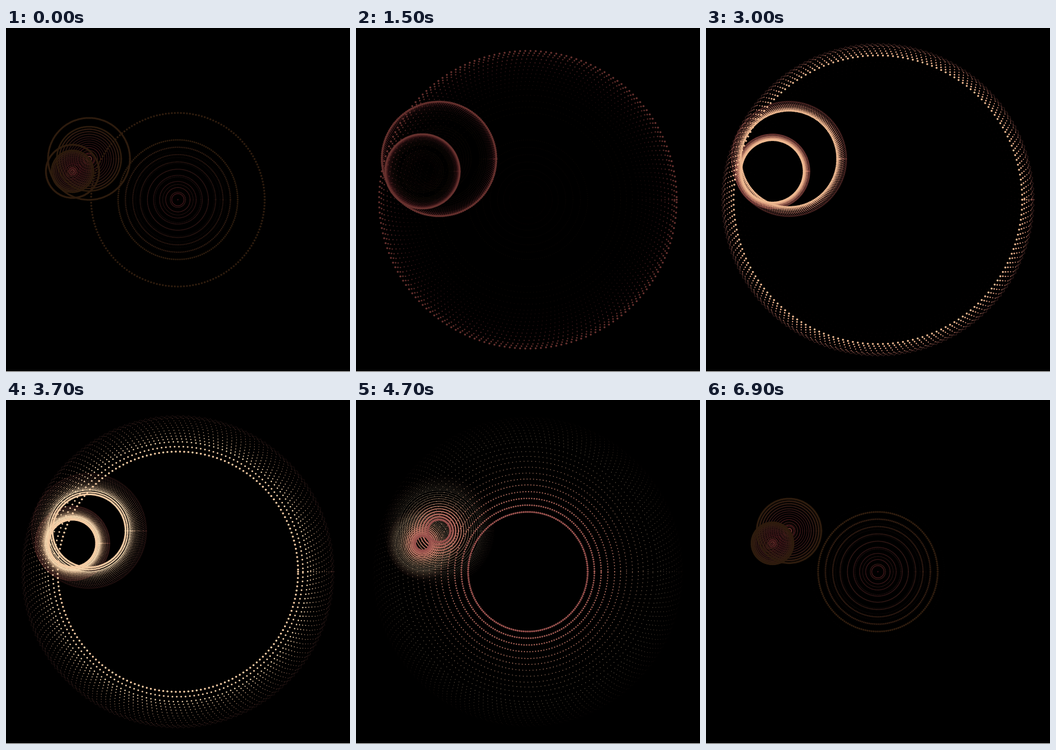
Write an HTML page with a canvas that moves like this. It is 600 px wide and 600 px high and loops after 7 s.

```html
<!DOCTYPE html>
<html>
<head>
<meta charset="utf-8">
<title>Breathing rings</title>
<style>
  html, body { margin: 0; height: 100%; background: #000; overflow: hidden; }
  canvas { display: block; width: 600px; height: 600px; }
</style>
</head>
<body>
<canvas id="stage" width="600" height="600"></canvas>
<script>
const ctx = document.getElementById('stage').getContext('2d');
const FRAMES = 70, STEP = 100, STATES = 16, DOTS = 180, WAKE = 24;

const rings = [
  { x: 299.8, y: 299.5, size: 272.5, phase: 0 },
  { x: 144.8, y: 228.3, size: 101, phase: 1 },
  { x: 116, y: 250, size: 65.5, phase: 1 },
];

// From the brightest state outwards to the darkest one.
const palette = [
  [250, 220, 180], [238, 185, 145], [205, 130, 110],
  [150, 80, 76], [115, 58, 54], [88, 40, 38],
  [74, 28, 32], [56, 27, 24], [46, 28, 14],
];

const mix = (a, b, t) => a + (b - a) * t;
const stateFrame = i => Math.round(i * (FRAMES - 1) / STATES);
const stateColor = i => palette[Math.abs(i - STATES / 2)];

function stateRadius(ring, i) {
  const k = i < 14 ? i + 3 : i - 14;
  return ring.size * Math.sin((k + ring.phase) * Math.PI / 16);
}

// Linear tween between the two states around a frame.
function tween(frame) {
  let i = 0;
  while (i < STATES - 1 && frame >= stateFrame(i + 1)) i++;
  const start = stateFrame(i);
  const t = (frame - start) / (stateFrame(i + 1) - start);
  const next = stateColor(i + 1);
  return {
    turn: t,
    color: stateColor(i).map((c, n) => Math.round(mix(c, next[n], t))),
    radii: rings.map(r => mix(stateRadius(r, i), stateRadius(r, i + 1), t)),
  };
}

const poses = Array.from({ length: FRAMES }, (_, f) => tween(f));

function drawPose(pose, age) {
  const life = 1 - age / WAKE;
  const size = mix(0.6, 1.75, life ** 6);
  ctx.fillStyle = `rgb(${pose.color})`;
  ctx.globalAlpha = life;
  rings.forEach((ring, n) => {
    const dot = place => {
      const a = place / DOTS * 2 * Math.PI;
      ctx.beginPath();
      ctx.arc(ring.x + pose.radii[n] * Math.cos(a),
              ring.y - pose.radii[n] * Math.sin(a), size, 0, 2 * Math.PI);
      ctx.fill();
    };
    // Each state moves the dots one place clockwise; one dot rests on the axis.
    for (let j = 1; j <= DOTS; j++) dot(j - pose.turn);
    dot(0);
  });
}

let shown = -1;
function render(now) {
  const frame = Math.floor(now / STEP) % FRAMES;
  if (frame !== shown) {
    shown = frame;
    ctx.globalAlpha = 1;
    ctx.fillStyle = '#000';
    ctx.fillRect(0, 0, 600, 599);
    for (let age = WAKE - 1; age >= 0; age--)
      drawPose(poses[(frame - age + FRAMES) % FRAMES], age);
    // Light edge under the black panel.
    ctx.globalAlpha = 1;
    ctx.fillStyle = '#fff';
    ctx.fillRect(0, 599, 600, 1);
  }
  requestAnimationFrame(render);
}
render(performance.now());
</script>
</body>
</html>
```
